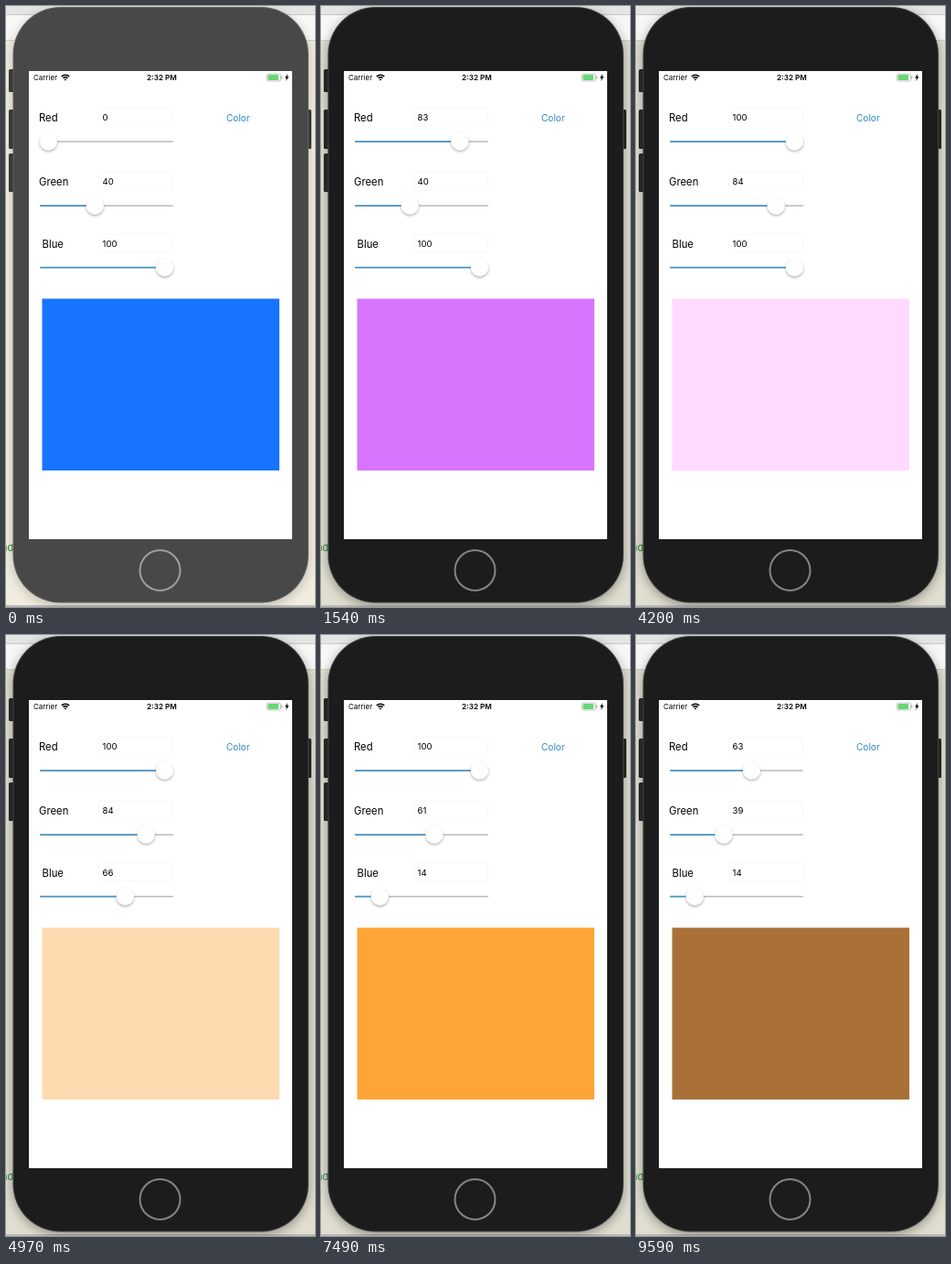
An HTML page with a canvas for the animation above (9660 ms loop, 338x656 px).

```html
<!DOCTYPE html>
<html lang="en">
<head>
<meta charset="utf-8">
<title>Colour sliders</title>
<style>
  html, body { margin: 0; height: 100%; overflow: hidden; }
  canvas { display: block; }
</style>
</head>
<body>
<canvas id="stage" width="338" height="656"></canvas>
<script>
const ctx = document.getElementById('stage').getContext('2d');
const LOOP = 9660, STEP = 70;

// [time in ms, slider value]
const sliders = [
  { name: 'Red', x: 36, y: 148,
    keys: [[490, 0], [1540, 83], [1890, 100], [8540, 100], [8610, 97], [8680, 97], [9310, 63]] },
  { name: 'Green', x: 36, y: 218,
    keys: [[3080, 40], [3850, 84], [7210, 84], [7490, 61], [7700, 39]] },
  { name: 'Blue', x: 39.5, y: 285.5,
    keys: [[4480, 100], [4970, 66], [5880, 20], [6160, 14]] }
];

function valueAt(keys, t) {
  if (t <= keys[0][0]) return keys[0][1];
  for (let i = 1; i < keys.length; i++) {
    const [t0, a] = keys[i - 1], [t1, b] = keys[i];
    if (t <= t1) return a + (b - a) * (t - t0) / (t1 - t0);
  }
  return keys[keys.length - 1][1];
}

const mix = (a, b, k) => `rgb(${a.map((c, i) => Math.round(c + (b[i] - c) * k))})`;

function rect(color, x, y, w, h) {
  ctx.fillStyle = color;
  ctx.fillRect(x, y, w, h);
}

function round(color, x, y, w, h, r) {
  ctx.fillStyle = color;
  ctx.beginPath();
  ctx.roundRect(x, y, w, h, r);
  ctx.fill();
}

function text(str, x, y, size, color = '#000', weight = 400) {
  ctx.font = `${weight} ${size}px Inter, sans-serif`;
  ctx.fillStyle = color;
  ctx.fillText(str, x, y);
}

function shadow(color, blur, dy) {
  ctx.shadowColor = color;
  ctx.shadowBlur = blur;
  ctx.shadowOffsetY = dy;
}

function drawPhone(fade) {
  rect(mix([240, 236, 222], [224, 222, 207], fade), 0, 0, 338, 656);
  rect('#f7f7f6', 0, 0, 338, 38);
  rect('#e5e5e5', 0, 0, 338, 9);
  rect('#c9c9c9', 0, 9, 338, 1);
  rect('#cfcfca', 0, 37, 338, 1);
  rect('#b9b9b5', 0, 654, 338, 2);
  text('nd', -5, 595, 11, '#238a2c');

  const button = mix([62, 62, 60], [42, 43, 42], fade);
  for (const [x, y, h] of [[3, 69, 25], [3, 113, 43], [3, 161, 42], [328, 113, 43]])
    round(button, x, y, 6, h, 1.5);

  shadow(`rgba(0,0,0,${0.2 + 0.15 * fade})`, 12, 3);
  round(mix([98, 98, 98], [62, 65, 70], fade), 7.5, 1, 323.5, 650.5, 52);
  shadow('transparent', 0, 0);
  round(mix([72, 72, 72], [28, 28, 28], fade), 8.5, 2, 321.5, 648.5, 51);

  ctx.strokeStyle = mix([158, 158, 158], [132, 132, 132], fade);
  ctx.lineWidth = 2;
  ctx.beginPath();
  ctx.arc(168.5, 616, 22, 0, 7);
  ctx.stroke();
  rect('#fff', 25, 71, 288, 511);
}

function drawStatusBar() {
  text('Carrier', 30, 81, 8);
  text('2:32 PM', 154, 81, 8.2, '#000', 600);

  ctx.strokeStyle = '#000';
  ctx.lineWidth = 1.5;
  for (const r of [3.5, 6]) {
    ctx.beginPath();
    ctx.arc(65, 81.3, r, -Math.PI * 0.75, -Math.PI * 0.25);
    ctx.stroke();
  }
  ctx.fillStyle = '#000';
  ctx.beginPath();
  ctx.moveTo(65, 81.5);
  ctx.arc(65, 81.5, 2, -Math.PI * 0.75, -Math.PI * 0.25);
  ctx.fill();

  ctx.strokeStyle = '#aaa';
  ctx.lineWidth = 0.7;
  ctx.beginPath();
  ctx.roundRect(285.5, 74, 15, 8, 1.8);
  ctx.stroke();
  round('#65d873', 286.5, 75, 11.5, 6, 1);
  rect('#aaa', 301.3, 76.5, 1, 3);
  ctx.fillStyle = '#000';
  ctx.fill(new Path2D('M308.2 74 305 78.5h2l-1 3.5 3.5-4.7h-2z'));
}

function drawSlider({ name, x, y }, value) {
  const knob = 46.5 + 1.27 * value;
  text(name, x, y - 22, 11.3);
  ctx.strokeStyle = '#f8f8f8';
  ctx.lineWidth = 1;
  ctx.beginPath();
  ctx.roundRect(101.5, y - 37, 81, 20, 3);
  ctx.stroke();
  text(Math.round(value), 105.5, y - 23, 9.6);

  round('#b9b9b9', 37, y - 0.7, 146, 1.4, 0.7);
  round('#3b8ec6', 37, y - 0.8, knob - 37, 1.6, 0.8);
  shadow('rgba(0,0,0,0.3)', 3, 1.5);
  round('#fff', knob - 9.7, y - 9.7, 19.4, 19.4, 9.7);
  shadow('transparent', 0, 0);
}

function draw(now) {
  const t = Math.floor(now % LOOP / STEP) * STEP;
  const values = sliders.map(s => valueAt(s.keys, t));
  drawPhone(Math.min(1, t / 280));
  drawStatusBar();
  sliders.forEach((s, i) => drawSlider(s, values[i]));
  text('Color', 241, 125.5, 10.1, '#3288c3');
  rect(`rgb(${values.map(v => Math.round(23 + 2.32 * v))})`, 39.5, 319.5, 259.5, 187.5);
}

let start;
function tick(now) {
  start ??= now;
  draw(now - start);
  requestAnimationFrame(tick);
}
requestAnimationFrame(tick);
</script>
</body>
</html>
```
